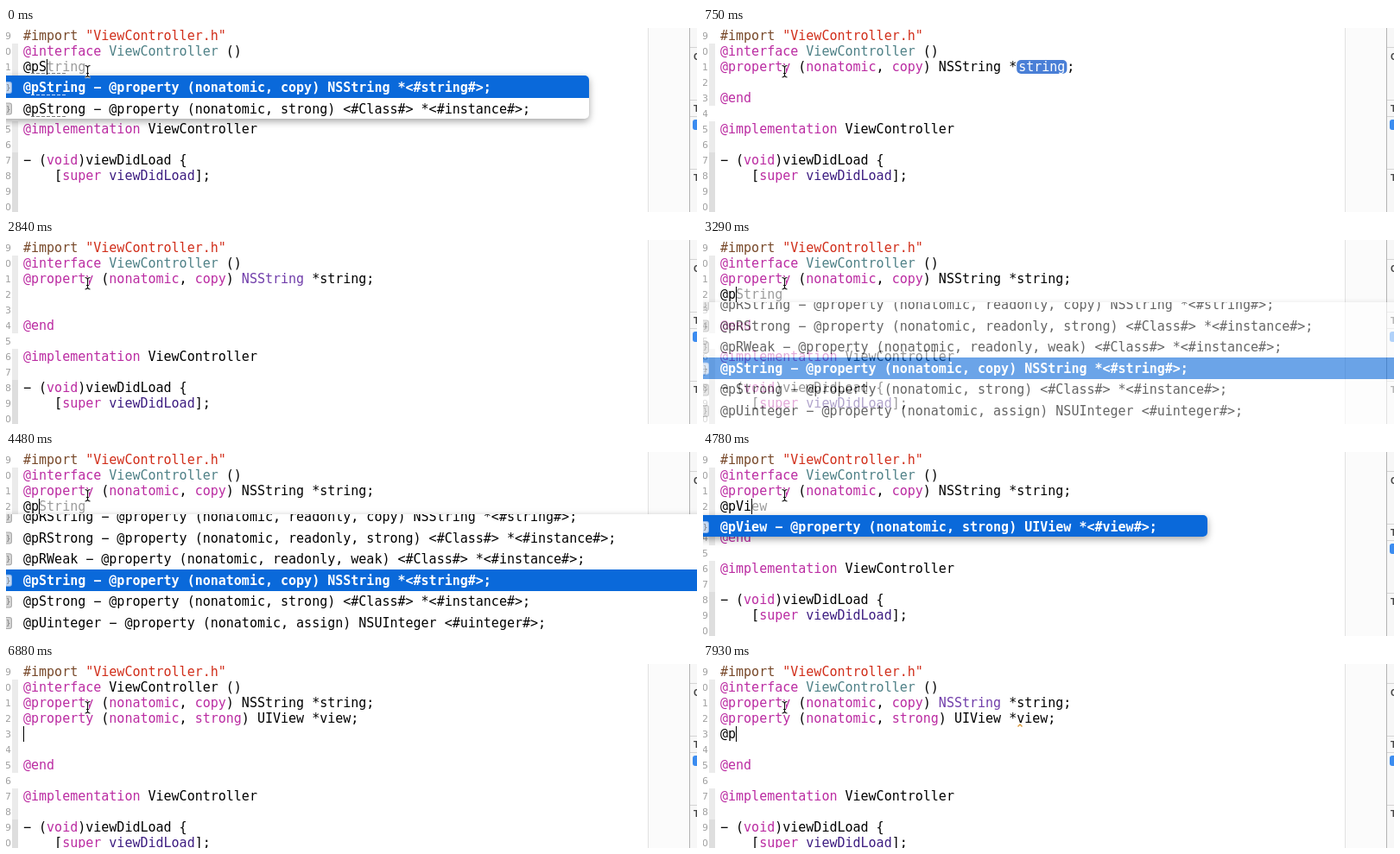
These frames come from a looping animation (800 by 213 pixels, 8000 ms). An HTML page with a canvas:

```html
<!DOCTYPE html>
<html lang="en">
<head>
<meta charset="utf-8">
<title>Code completion</title>
<style>
  html, body { margin: 0; height: 100%; overflow: hidden; background: #fff; }
  canvas { display: block; }
</style>
</head>
<body>
<canvas id="stage" width="800" height="213"></canvas>
<script>
const LOOP = 8000, ROW = 18, LEFT = 20, PITCH = 24.6;
const FONT = '15px "DejaVu Sans Mono", monospace';
const INK = '#000', PINK = '#bb2ca2', TEAL = '#4f8187', PURPLE = '#703daa', GHOST = '#9c9c9c', BLUE = '#0a69da';

const syntax = { '#import': '#78492a', '"ViewController.h"': '#d12f1b' };
for (const word of '@interface @implementation @property @end nonatomic copy strong void super'.split(' '))
  syntax[word] = PINK;

// from, to, row, column
const carets = [
  [0, 150, 2, 3], [1650, 1950, 2, 44], [1950, 2400, 2, 45], [2400, 2840, 3, 0],
  [2990, 3290, 3, 1], [3290, 3890, 3, 2], [4480, 4630, 3, 2], [4630, 4780, 3, 3],
  [4780, 5380, 3, 4], [6280, 6430, 3, 42], [6430, 6880, 3, 43], [6880, 7480, 4, 0],
  [7780, 7930, 4, 1], [7930, 8000, 4, 2]
];

const STRING = '@pString − @property (nonatomic, copy) NSString *<#string#>;';
const STRONG = '@pStrong − @property (nonatomic, strong) <#Class#> *<#instance#>;';
const VIEW = '@pView − @property (nonatomic, strong) UIView *<#view#>;';
const ALL = [
  '@pRString − @property (nonatomic, readonly, copy) NSString *<#string#>;',
  '@pRStrong − @property (nonatomic, readonly, strong) <#Class#> *<#instance#>;',
  '@pRWeak − @property (nonatomic, readonly, weak) <#Class#> *<#instance#>;',
  STRING, STRONG,
  '@pUinteger − @property (nonatomic, assign) NSUInteger <#uinteger#>;'
];

const screen = document.getElementById('stage').getContext('2d');
const layer = document.createElement('canvas');
layer.width = 800;
layer.height = 213;
const overlay = layer.getContext('2d');
screen.font = FONT;
const CELL = screen.measureText('0').width;
let time = 0;

const during = (from, to = LOOP) => time >= from && time < to;
const column = n => LEFT + n * CELL;

function rect(g, x, y, w, h, color) {
  g.fillStyle = color;
  g.fillRect(x, y, w, h);
}

function text(g, string, x, baseline, color, font = FONT) {
  g.font = font;
  g.fillStyle = color;
  g.fillText(string, x, baseline);
}

function roundRect(g, x, y, w, h, r, color) {
  g.beginPath();
  g.roundRect(x, y, w, h, r);
  g.fillStyle = color;
  g.fill();
}

function dashes(g, from, to, y, color) {
  for (let x = from; x < to; x += 6) rect(g, x, y, 4, 1, color);
}

function code(row, string, colors = {}) {
  let n = 0;
  for (const part of string.split(/("[^"]*"|[#@]?\w+)/)) {
    text(screen, part, column(n), row * ROW + 14, colors[part] || syntax[part] || INK);
    n += part.length;
  }
}

// A declaration whose name is first a placeholder, then selected, then plain.
function property(row, head, name, selectAt, plainAt, colors) {
  const x = column(head.length), y = row * ROW, width = name.length * CELL;
  code(row, head, colors);
  const pill = time < selectAt;
  if (pill) roundRect(screen, x, y + 1, width + 4, 16, 5, '#4a7fd6');
  else if (time < plainAt) rect(screen, 363, y, Math.round(x + width) - 362, ROW, '#b2d7fe');
  text(screen, name, x + (pill ? 2 : 0), y + 14, pill ? '#fff' : INK);
  text(screen, ';', x + width + (pill ? 4 : 0), y + 14, INK);
}

function typing(row, typed, rest = '') {
  text(screen, typed, LEFT, row * ROW + 14, INK);
  text(screen, rest, column(typed.length), row * ROW + 14, GHOST);
}

function popup(top, right, bottom, baseline, items, selected, alpha = 1) {
  const g = overlay;
  g.clearRect(0, 0, 800, 213);
  g.save();
  g.shadowColor = 'rgba(0,0,0,.36)';
  g.shadowBlur = 8;
  g.shadowOffsetY = 3;
  roundRect(g, -30, top, right + 30, bottom - top, 5, '#fff');
  g.restore();
  g.save();
  g.beginPath();
  g.roundRect(-30, top, right + 30, bottom - top, 5);
  g.clip();
  items.forEach((item, i) => {
    const y = baseline + i * PITCH, chosen = i === selected;
    if (chosen) {
      const start = i ? Math.round(y - 18) : top;
      rect(g, 0, start, right, Math.round(y + 7) - start, BLUE);
    }
    roundRect(g, -8, y - 12, 15, 14, 3, chosen ? '#8fb4e6' : '#a9a9a9');
    roundRect(g, -8, y - 11, 14, 12, 2, chosen ? '#c5d9f3' : '#d6d6d6');
    text(g, '}', 0, y - 2, '#777', '9px "DejaVu Sans Mono", monospace');
    text(g, item, LEFT, y, chosen ? '#fff' : INK, chosen ? 'bold ' + FONT : FONT);
    if (items.length === 2) dashes(g, LEFT + 9, column(5), Math.round(y) + 3, chosen ? '#cfe0f7' : '#777');
  });
  g.restore();
  screen.globalAlpha = alpha;
  screen.drawImage(layer, 0, 0);
  screen.globalAlpha = 1;
}

function chrome(shift) {
  const edge = row => (row + shift) * ROW;
  rect(screen, 0, 0, 800, 213, '#fff');
  rect(screen, 7, ROW, 7, edge(5) - ROW, '#ebebeb');
  rect(screen, 7, edge(6), 7, 213, '#ebebeb');
  rect(screen, 7, edge(8), 7, 213, '#dedede');
  for (let row = 0; row < 12; row++)
    text(screen, (row + 9) % 10, -1, row * ROW + 13, '#a0a0a0', '11px "DejaVu Sans", sans-serif');

  rect(screen, 743, 0, 57, 213, '#fbfbfb');
  rect(screen, 743, 0, 1, 213, '#e2e2e2');
  rect(screen, 792, 0, 8, 213, '#f7f7f7');
  rect(screen, 791, 0, 1, 213, '#b4b4b4');
  for (const y of [22, 83, 102, 163]) rect(screen, 792, y, 8, 1, '#d4d4d4');
  const label = 'bold 11px "Liberation Sans", sans-serif';
  text(screen, 'C', 796, 37, '#444', label);
  text(screen, 'T', 796, 97, '#444', label);
  text(screen, 'T', 796, 177, '#444', label);
  roundRect(screen, 795, 106, 12, 12, 3, '#3b8cf0');
}

function pointer() {
  const path = new Path2D('M91.5 43.5Q94.5 43.5 94.5 46V54.5Q94.5 57 91.5 57M97.5 43.5Q94.5 43.5 94.5 46M94.5 54.5Q94.5 57 97.5 57M93 52.5H96');
  for (const [width, color] of [[2.6, '#fff'], [1.1, '#111']]) {
    screen.lineWidth = width;
    screen.strokeStyle = color;
    screen.stroke(path);
  }
}

function draw() {
  const shift = time < 2400 ? 0 : time < 6880 ? 1 : 2;
  const reparsing = during(2400, 2840) || during(6880, 7480);
  const stringKnown = during(1950, 2400) || during(2840, 2990) || during(5680, 6880) || during(7480);
  const viewKnown = during(6580, 6880) || during(7480, 7780);

  chrome(shift);
  code(0, '#import "ViewController.h"');
  code(1, '@interface ViewController ()', { ViewController: reparsing ? INK : TEAL });
  code(4 + shift, '@end');
  code(6 + shift, '@implementation ViewController');
  code(8 + shift, '− (void)viewDidLoad {');
  code(9 + shift, '    [super viewDidLoad];', { viewDidLoad: '#3d1d81' });

  if (time < 750) {
    typing(2, '@pS', 'tring');
    dashes(screen, LEFT + 9, column(5), 52, '#888');
  } else {
    property(2, '@property (nonatomic, copy) NSString *', 'string', 1350, 1650, { NSString: stringKnown ? PURPLE : INK });
  }

  if (during(2990, 3290)) typing(3, '@');
  if (during(3290, 4630)) typing(3, '@p', 'String');
  if (during(4630, 4780)) typing(3, '@pV', 'iew');
  if (during(4780, 5380)) typing(3, '@pVi', 'ew');
  if (during(5380))
    property(3, '@property (nonatomic, strong) UIView *', 'view', 5980, 6280, { UIView: viewKnown ? PURPLE : INK });

  if (during(7480)) {
    screen.lineWidth = 1.4;
    screen.strokeStyle = '#d99a3c';
    screen.stroke(new Path2D('M364.5 72.5L367 70L369.5 72.5'));
  }
  if (during(7780)) typing(4, time < 7930 ? '@' : '@p');

  if (time < 750) popup(55, 675, 105, 74, [STRING, STRONG], 0);
  if (during(3290, 4630)) popup(72, 830, 240, 80, ALL, 3, time < 3440 ? 0.6 : 1);
  if (during(4630, 5380)) popup(73, 584, 98, 92, [VIEW], 0);

  for (const [from, to, row, n] of carets)
    if (during(from, to)) rect(screen, Math.floor(column(n)), row * ROW, 1, ROW, INK);
  pointer();
}

function tick() {
  time = performance.now() % LOOP;
  draw();
  requestAnimationFrame(tick);
}
tick();
</script>
</body>
</html>
```
